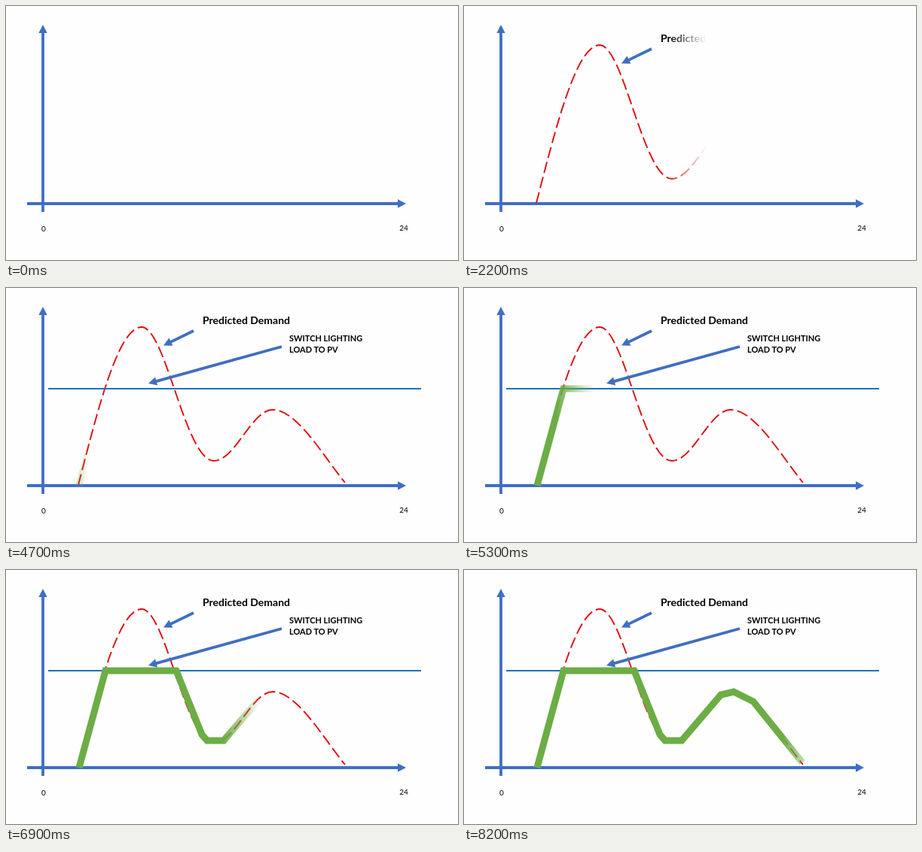
An HTML page that plays this animation: 600x338 px, repeating every 8300 ms.

```html
<!DOCTYPE html>
<html lang="en">
<head>
<meta charset="utf-8">
<title>Predicted demand</title>
<style>
  html, body { margin: 0; width: 100%; height: 100%; overflow: hidden; background: #fefefe; }
  svg { display: block; width: 100vw; height: 100vh; }
  text { font-family: Lato, "Open Sans", sans-serif; font-size: 10px; }
  .label { font-size: 14px; font-weight: bold; }
  .note { font-size: 11px; font-weight: bold; }
  .arrow { stroke: #3f6ec3; fill: #3f6ec3; }
</style>
</head>
<body>
<svg viewBox="0 0 600 338">
  <defs>
    <linearGradient id="demandEdge" gradientUnits="userSpaceOnUse" y1="0" y2="0">
      <stop offset="0" stop-color="#fff"/><stop offset="1" stop-color="#000"/>
    </linearGradient>
    <linearGradient id="supplyEdge" gradientUnits="userSpaceOnUse" y1="0" y2="0">
      <stop offset="0" stop-color="#fff"/><stop offset="1" stop-color="#000"/>
    </linearGradient>
    <mask id="demandMask" maskUnits="userSpaceOnUse" x="0" y="0" width="600" height="338">
      <rect width="600" height="338" fill="url(#demandEdge)"/>
    </mask>
    <mask id="supplyMask" maskUnits="userSpaceOnUse" x="0" y="0" width="600" height="338">
      <rect width="600" height="338" fill="url(#supplyEdge)"/>
    </mask>
  </defs>

  <g id="axes">
    <text x="50" y="299.5" text-anchor="middle">0</text>
    <text x="528" y="298.5" text-anchor="middle">24</text>
  </g>

  <g id="demand" mask="url(#demandMask)">
    <path d="M96 262C120 170 148 52 180 52C212 52 238 230 276 230C304 230 326 162 354 162C386 162 420 222 450 259"
      fill="none" stroke="#e00b10" stroke-width="1.9" stroke-dasharray="15 5.6"/>
    <text class="label" x="261" y="48">Predicted Demand</text>
  </g>

  <g id="limit">
    <path d="M56 134H551" stroke="#1f71b8" stroke-width="1.8"/>
    <text class="note" x="376" y="71">SWITCH LIGHTING</text>
    <text class="note" x="376" y="86">LOAD TO PV</text>
  </g>

  <path mask="url(#supplyMask)" d="M97 263L132 134H226L260 219L267 227H289L341 166L358 162L384 175L449 256"
    fill="none" stroke="#6cad45" stroke-width="9"/>
</svg>
<script>
const LOOP = 8300, SPEED = 0.1033, FEATHER = 50;
const byId = id => document.getElementById(id);

function addArrow(parent, x1, y1, x2, y2) {
  const length = Math.hypot(x2 - x1, y2 - y1);
  const angle = Math.atan2(y2 - y1, x2 - x1) * 180 / Math.PI;
  byId(parent).insertAdjacentHTML('beforeend',
    `<g class="arrow" transform="translate(${x1} ${y1}) rotate(${angle})">
      <path d="M0 0H${length - 10}" stroke-width="3.8"/>
      <path d="M${length} 0l-11 -5.7v11.4z" stroke="none"/></g>`);
}

function wipe(id, startX, elapsed) {
  const front = startX + SPEED * Math.max(0, elapsed);
  byId(id).setAttribute('x1', front - FEATHER);
  byId(id).setAttribute('x2', front);
}

function draw() {
  const t = performance.now() % LOOP;
  wipe('demandEdge', 94, t);
  byId('limit').setAttribute('opacity', Math.min(1, Math.max(0, (t - 4000) / 500)));
  wipe('supplyEdge', 92, t - 4520);
  requestAnimationFrame(draw);
}

addArrow('axes', 49, 274, 49, 25);
addArrow('axes', 28, 263, 531, 263);
addArrow('demand', 249, 57, 209, 76.5);
addArrow('limit', 366, 78, 189, 127);
draw();
</script>
</body>
</html>
```
